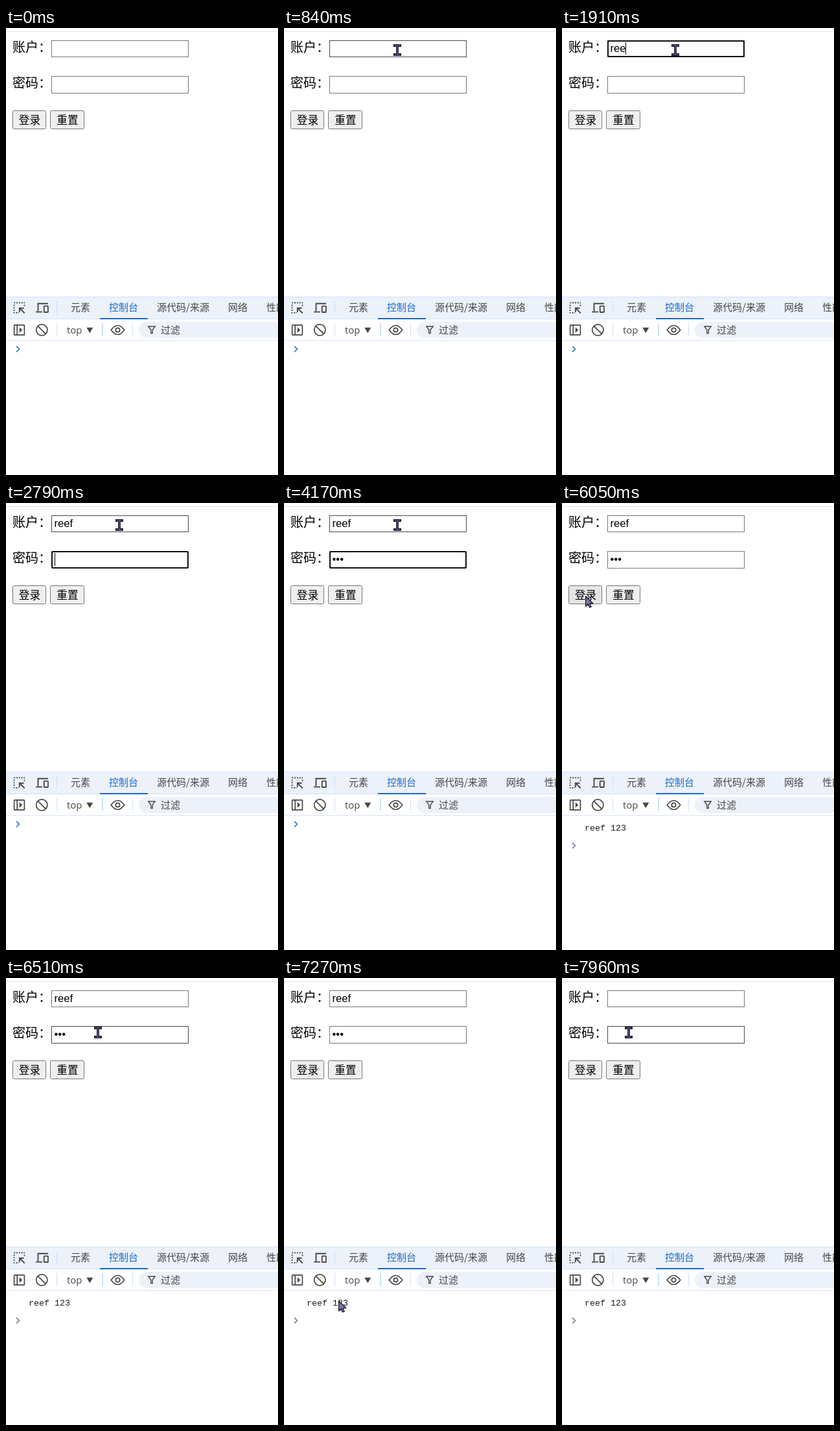
Recreate the animation shown at these times as an HTML page. Size 420 px wide and 689 px high, loop 8 s.

```html
<!DOCTYPE html>
<html lang="zh-CN">
<head>
<meta charset="utf-8">
<title>登录</title>
<style>
  html, body { margin: 0; width: 100%; height: 100%; overflow: hidden; background: #fff; }
  svg { display: block; width: 420px; height: 689px; }
  text { white-space: pre; }
  .cjk { font-family: "Noto Sans CJK SC", "Noto Sans CJK", sans-serif; }
  .label { font-size: 20px; fill: #000; }
  .btn-text { font-size: 16.67px; text-anchor: middle; fill: #000; }
  .ui { font-size: 15px; fill: #474747; }
  .field-text { font: 16.67px "Liberation Sans", Arial, sans-serif; fill: #000; }
  .log { font: 13.33px "Liberation Mono", monospace; fill: #1f1f1f; }
  .field { fill: #fff; stroke: #767676; }
  .field.hover { stroke: #484848; }
  .ring { fill: none; stroke: #101010; stroke-width: 2; }
  .btn { fill: #efefef; stroke: #767676; }
  .btn.hover { fill: #e5e5e5; }
  .btn.press { fill: #f5f5f5; }
  .icon { fill: none; stroke: #474747; stroke-width: 1.7; }
  .solid { fill: #474747; }
  .sep { fill: #cfe0fa; }
</style>
</head>
<body>
<svg viewBox="0 0 420 689" xmlns="http://www.w3.org/2000/svg">
  <rect width="420" height="689" fill="#fff"/>
  <rect y="5" width="420" height="1" fill="#dfe4ec"/>

  <!-- login form -->
  <text class="cjk label" x="10" y="37.4">账户：</text>
  <text class="cjk label" x="10" y="92.4">密码：</text>
  <rect class="field" id="userBox" x="70.5" y="19.5" width="211" height="25"/>
  <rect class="field" id="passBox" x="70.5" y="74.5" width="211" height="26"/>
  <rect class="ring" id="userRing" x="71" y="20" width="210" height="24" rx="2"/>
  <rect class="ring" id="passRing" x="71" y="75" width="210" height="25" rx="2"/>
  <text class="field-text" id="user" x="74.5" y="37"></text>
  <text class="field-text" id="pass" x="74.5" y="92"></text>
  <rect id="userCaret" y="22" width="1" height="19"/>
  <rect id="passCaret" y="77" width="1" height="20"/>
  <rect class="btn" id="login" x="10.5" y="127.5" width="51" height="28" rx="2"/>
  <rect class="btn" id="reset" x="68.5" y="127.5" width="52" height="28" rx="2"/>
  <text class="cjk btn-text" x="36.5" y="148.3">登录</text>
  <text class="cjk btn-text" x="95" y="148.3">重置</text>

  <!-- panel tabs -->
  <rect y="414" width="420" height="35" fill="#ecf1fa"/>
  <rect y="414" width="420" height="1" fill="#d3e3fd"/>
  <rect y="448" width="420" height="1" fill="#d3e3fd"/>
  <rect x="145" y="447" width="74" height="2" fill="#1b6ac4"/>
  <g class="cjk ui">
    <text x="100" y="436.4">元素</text>
    <text x="159" y="436.4" fill="#1b6ac4">控制台</text>
    <text x="233" y="436.4">源代码/来源</text>
    <text x="343" y="436.4">网络</text>
    <text x="402" y="436.4">性能</text>
  </g>
  <g class="icon">
    <path d="M12.3 423.5H29M12.5 426.5V440M15.5 439H20M28.5 426.5V430" stroke-width="1.8" stroke-dasharray="1.9 1.9"/>
    <path d="M28.8 439.6L21.2 432M20.8 438V431.8H27.5" stroke-width="1.9"/>
    <path d="M65 424.8H49.5V436.5M46 437.6H56" stroke-width="1.9"/>
    <rect x="58.7" y="428.6" width="6.2" height="9.4" rx=".6" stroke-width="1.8"/>
  </g>

  <!-- console toolbar -->
  <rect y="481" width="420" height="1" fill="#d9e5f8"/>
  <g class="sep">
    <rect x="78" y="421" width="1" height="20"/>
    <rect x="78" y="455" width="1" height="20"/>
    <rect x="148" y="455" width="2" height="20"/>
    <rect x="195" y="455" width="1" height="20"/>
  </g>
  <rect x="205" y="453" width="240" height="25" rx="12.5" fill="#ecf1fa"/>
  <g class="icon">
    <rect x="12.6" y="457.8" width="15.8" height="15.4" rx="1"/>
    <path d="M17.2 458V473"/>
    <circle cx="55.3" cy="465.5" r="8.6"/>
    <path d="M49.4 459.6L61.2 471.4"/>
    <path d="M162.3 465.5Q172.5 451.5 182.7 465.5Q172.5 479.5 162.3 465.5Z"/>
    <circle cx="172.5" cy="465.5" r="3.2"/>
    <path d="M219.8 460H230.2L226.2 465.3V470.5H223.8V465.3Z" stroke-width="1.4"/>
  </g>
  <path class="solid" d="M20.8 461.3V469.7L25.2 465.5ZM124.3 461.8H134.3L129.3 470.2Z"/>
  <text x="94" y="470.7" fill="#474747" font-size="15" font-family="Open Sans, sans-serif">top</text>
  <text class="cjk ui" x="239" y="471">过滤</text>

  <!-- console -->
  <text class="log" id="log" x="35" y="505"></text>
  <path id="prompt" d="M16 -4.3L20.4 0L16 4.3" fill="none" stroke-width="1.7"/>

  <!-- pointer -->
  <g id="pointer">
    <path id="arrow" d="M.6 .8V16.2L4.3 12.9L6.6 18L9.2 16.9L6.9 11.8H11.8Z" fill="#7d79a6" stroke="#17142a" stroke-width="1.3" stroke-linejoin="round"/>
    <g id="beam" fill="none">
      <path d="M-6 -7H6M-6 7H6M0 -7V7" stroke="#16142c" stroke-width="3.8"/>
      <path d="M-4.6 -7H4.6M-4.6 7H4.6M0 -7V7" stroke="#7a76a8" stroke-width="1"/>
    </g>
  </g>
</svg>
<script>
const LOOP = 8000;
const NAME = "reef";
const $ = id => document.getElementById(id);
const show = (id, on) => { $(id).style.display = on ? "" : "none"; };
const within = (t, spans) => spans.some(([a, b]) => t >= a && t < b);
const count = (t, times) => times.filter(v => t >= v).length;

const userKeys = [1600, 1790, 1910, 2160];
const passKeys = [3400, 3510, 3610];
const userCarets = [75, 80, 89, 98, 103];
const passCarets = [75, 80, 86, 92];
const FOCUS_USER = 910, FOCUS_PASS = 2790, PRESS_LOGIN = 5930;
const LOGGED = 6020, PRESS_RESET = 7710, CLEARED = 7780;

// start, number of steps, step length, way points
const moves = [
  [60, 12, 70.9, [[403, 670], [371, 503], [286, 303], [240, 192], [209, 131], [174, 58], [175, 34]]],
  [5430, 3, 60, [[128, 108], [70, 167], [43, 200]]],
  [5680, 3, 90, [[40, 170], [37, 148], [36, 143]]],
  [6250, 7, 63.3, [[48, 148], [65, 146], [90, 125], [118, 102], [142, 84], [149, 66], [151, 53]]],
  [6880, 13, 65, [[147, 75], [108, 240], [79, 346], [84, 497], [84, 497], [88, 300], [95, 140]]],
  [7960, 1, 40, [[103, 84]]]
];

function pointerAt(t) {
  const move = moves.filter(m => t >= m[0]).pop();
  if (!move) return null;
  const [start, steps, dt, pts] = move;
  const k = Math.min(Math.floor((t - start) / dt), steps - 1);
  const u = steps > 1 ? k / (steps - 1) * (pts.length - 1) : 0;
  const i = Math.floor(u), a = pts[i], b = pts[i + 1] || a;
  return a.map((v, n) => Math.round(v + (b[n] - v) * (u - i)));
}

function over(id, p) {
  if (!p) return false;
  const [x, y, w, h] = ["x", "y", "width", "height"].map(k => +$(id).getAttribute(k));
  return p[0] >= x && p[0] <= x + w && p[1] >= y && p[1] <= y + h;
}

function render(t) {
  const filled = t < CLEARED;
  const nu = filled ? count(t, userKeys) : 0;
  const np = filled ? count(t, passKeys) : 0;
  $("user").textContent = NAME.slice(0, nu);
  $("pass").textContent = "•".repeat(np);

  show("userRing", within(t, [[FOCUS_USER, FOCUS_PASS]]));
  show("passRing", within(t, [[FOCUS_PASS, PRESS_LOGIN]]));
  show("userCaret", within(t, [[FOCUS_USER, 1410], [1600, 2670]]));
  show("passCaret", within(t, [[FOCUS_PASS, 3290], [3400, 4170], [4670, 5230], [5730, PRESS_LOGIN]]));
  $("userCaret").setAttribute("x", userCarets[nu]);
  $("passCaret").setAttribute("x", passCarets[np]);

  const logged = t >= LOGGED;
  $("log").textContent = logged ? NAME + " 123" : "";
  $("prompt").setAttribute("transform", `translate(0 ${logged ? 528 : 495})`);
  $("prompt").setAttribute("stroke", logged ? "#7c7a9c" : "#3a78bf");

  const p = pointerAt(t);
  for (const id of ["userBox", "passBox", "login", "reset"])
    $(id).classList.toggle("hover", over(id, p));
  $("login").classList.toggle("press", within(t, [[PRESS_LOGIN, LOGGED]]));
  $("reset").classList.toggle("press", within(t, [[PRESS_RESET, CLEARED]]));

  show("pointer", p);
  if (p) {
    const text = over("userBox", p) || over("passBox", p);
    show("beam", text);
    show("arrow", !text);
    $("pointer").setAttribute("transform", `translate(${p})`);
  }
}

const begin = performance.now();
function tick() {
  render((performance.now() - begin) % LOOP);
  requestAnimationFrame(tick);
}
tick();
</script>
</body>
</html>
```
